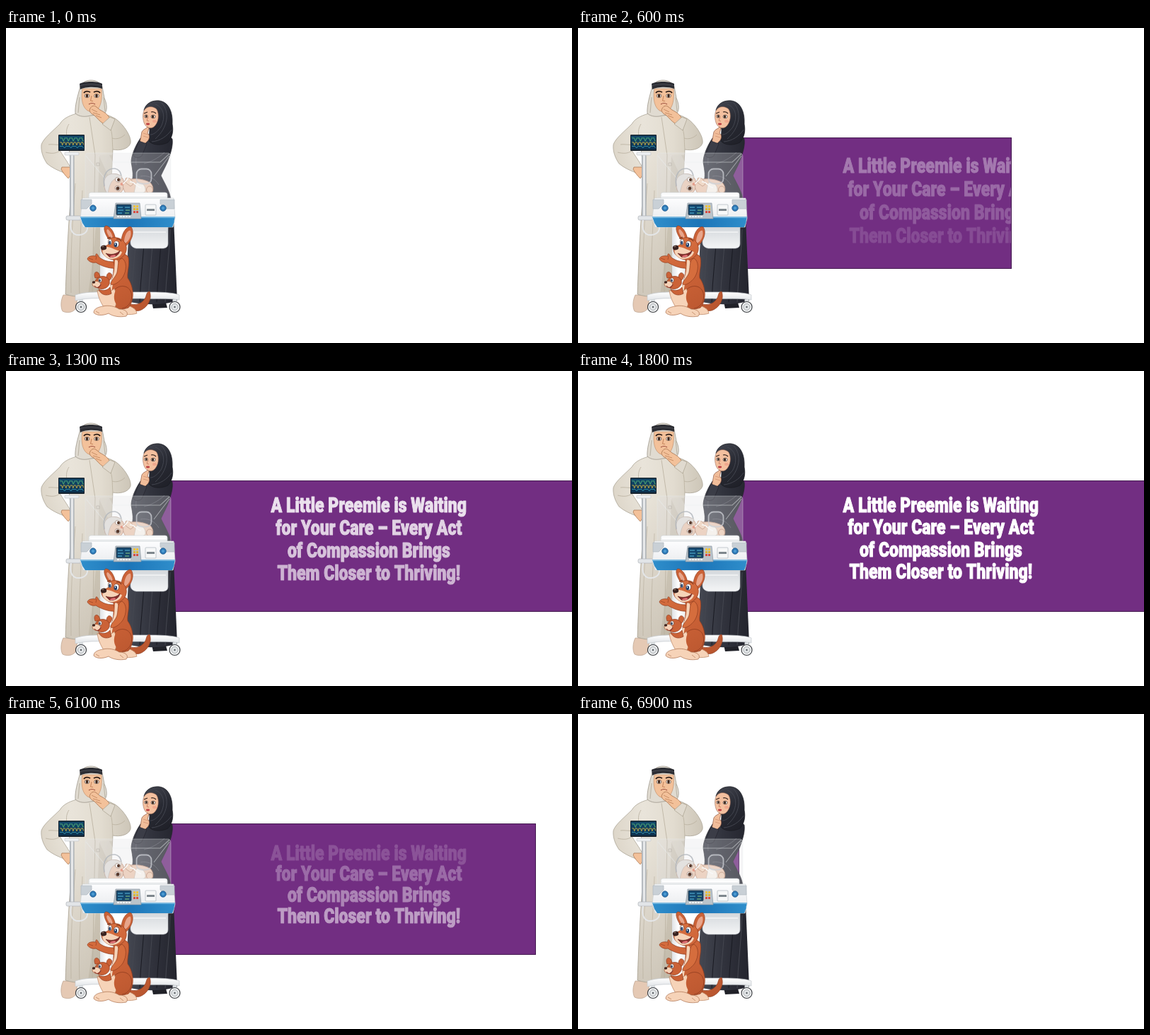
Write an HTML page with a canvas that moves like this. It is 800 by 446 pixels and loops after 7000 ms.

```html
<!DOCTYPE html>
<html lang="en">
<head>
<meta charset="utf-8">
<title>Preemie care banner</title>
<style>
  html, body { margin: 0; width: 100%; height: 100%; overflow: hidden; background: #fff; }
  canvas { display: block; width: 800px; height: 446px; }
</style>
</head>
<body>
<canvas id="stage" width="800" height="446"></canvas>
<script>
const ctx = document.getElementById('stage').getContext('2d');
const LOOP = 7000, STEP = 100;
const PURPLE = '#722e82', SKIN = '#f3c19a', FUR = '#cb6237', FUR_DARK = '#8f3b1f', CREAM = '#f6d3b8';

// Drawing helpers
function fade(x0, y0, x1, y1, ...colors) {
  const g = ctx.createLinearGradient(x0, y0, x1, y1);
  colors.forEach((c, i) => g.addColorStop(i / (colors.length - 1), c));
  return g;
}
function shape(d, fill, stroke, width = 0.7) {
  const p = new Path2D(d);
  if (fill) { ctx.fillStyle = fill; ctx.fill(p); }
  if (stroke) { ctx.strokeStyle = stroke; ctx.lineWidth = width; ctx.stroke(p); }
}
const line = (d, color, width = 0.8) => shape(d, null, color, width);
function oval(x, y, rx, ry, fill, stroke, turn = 0, width = 0.7) {
  ctx.beginPath();
  ctx.ellipse(x, y, rx, ry, turn, 0, Math.PI * 2);
  if (fill) { ctx.fillStyle = fill; ctx.fill(); }
  if (stroke) { ctx.strokeStyle = stroke; ctx.lineWidth = width; ctx.stroke(); }
}
function box(x, y, w, h, fill, r = 0, stroke, width = 0.7) {
  ctx.beginPath();
  ctx.roundRect(x, y, w, h, r);
  ctx.fillStyle = fill;
  ctx.fill();
  if (stroke) { ctx.strokeStyle = stroke; ctx.lineWidth = width; ctx.stroke(); }
}

// Motion
const clamp = v => Math.min(1, Math.max(0, v));
const edgeKeys = [
  [0, 210], [100, 233], [400, 446], [800, 756], [900, 793], [1000, 806],
  [5900, 806], [6000, 790], [6100, 749], [6200, 689], [6800, 262], [6900, 228], [7000, 210]
];
function slope(i) {
  const a = edgeKeys[i - 1], b = edgeKeys[i], c = edgeKeys[i + 1];
  if (!a || !c) return 0;
  const l = (b[1] - a[1]) / (b[0] - a[0]), r = (c[1] - b[1]) / (c[0] - b[0]);
  return l * r <= 0 ? 0 : 2 * l * r / (l + r);
}
function edgeAt(t) {
  const i = edgeKeys.findIndex((k, n) => n && t <= k[0]) - 1;
  const [t0, v0] = edgeKeys[i], [t1, v1] = edgeKeys[i + 1];
  const d = t1 - t0, u = (t - t0) / d, w = 1 - u;
  return v0 * (1 + 2 * u) * w * w + v1 * u * u * (3 - 2 * u)
    + d * u * w * (slope(i) * w - slope(i + 1) * u);
}

const lines = [
  'A Little Preemie is Waiting',
  'for Your Care – Every Act',
  'of Compassion Brings',
  'Them Closer to Thriving!'
];
const CONDENSED = 0.8;

function drawBanner(t) {
  const edge = edgeAt(t);
  if (edge <= 212) return;
  ctx.save();
  ctx.beginPath();
  ctx.rect(0, 0, edge, 446);
  ctx.clip();
  box(212, 155, 594, 186, PURPLE);
  ctx.font = '900 28.8px Roboto, "Open Sans", sans-serif';
  ctx.textAlign = 'center';
  ctx.textBaseline = 'alphabetic';
  ctx.lineWidth = 1.1;
  ctx.lineJoin = 'round';
  lines.forEach((text, i) => {
    const into = clamp((t - 100 - 100 * i) / 1400);
    const out = clamp((t - 5400 - 100 * i) / 850);
    const drop = 13 * (1 - into) ** 2 + 10 * out ** 2;
    // Mixed solid colour, so that outline and fill do not add up
    const mix = (from) => Math.round(from + (255 - from) * into * (1 - out));
    ctx.fillStyle = ctx.strokeStyle = `rgb(${mix(114)}, ${mix(46)}, ${mix(130)})`;
    ctx.save();
    ctx.translate(512.8, 200 + 31.4 * i + drop);
    ctx.scale(CONDENSED, 1);
    ctx.fillText(text, 0, 0);
    ctx.strokeText(text, 0, 0);
    ctx.restore();
  });
  ctx.restore();
  ctx.strokeStyle = '#43194f';
  ctx.lineWidth = 1;
  ctx.strokeRect(212.5, 155.5, Math.round(edge) - 213, 185);
}

function drawMan() {
  const cloth = fade(50, 0, 176, 0, '#ddd6c9', '#e9e4da', '#e2dcd0', '#cdc6b8');
  const fold = '#b9b09f';
  shape('M81 378 C77 386 77 396 80 401 C86 404 94 403 98 398 L102 379 Z', '#e5c9b4', '#b99f8b');
  const robe = 'M104 120 C92 123 81 127 76 136 C66 146 53 156 50 165 C49 174 52 183 58 192 C65 198 74 202 82 205 L91 197 C86 188 80 180 76 173 L88 161 L94 214 C89 260 86 320 84 377 C98 382 118 381 131 376 L136 300 L148 235 L151 172 C160 174 173 172 176 163 C178 153 164 134 154 128 C145 123 135 121 128 118 Z';
  shape(robe, cloth, '#a39b8c');
  shape(robe, fade(0, 180, 0, 380, 'rgba(150,138,118,0)', 'rgba(150,138,118,.3)'));
  shape('M132 180 L150 180 L147 235 L135 300 L131 376 L116 378 C126 310 130 250 132 180 Z', 'rgba(150,138,118,.2)');
  shape('M79 197 L91 197 C93 203 91 210 88 213 C83 208 80 204 78 200 Z', SKIN, '#a5714d');
  line('M118 126 L126 180 L122 376', fold);
  line('M88 161 C84 150 85 142 89 136 M60 165 C68 164 76 167 84 164 M56 176 C64 178 70 178 76 174', fold);
  line('M98 220 C94 270 91 320 92 375 M108 230 C106 290 102 330 104 378', 'rgba(170,160,142,.6)');
  line('M148 143 C151 152 150 163 151 172 M168 151 C163 156 156 158 150 156', fold);
  shape('M128 191 h4 v4 h-4 z', null, '#aaa294', 0.6);
  // Head
  shape('M105 83 C101 97 97 111 98 121 C104 126 112 126 120 124 L138 122 C144 118 143 108 139 99 L136 83 C131 71 109 71 105 83 Z', '#e0dbd1', '#928c80');
  line('M104 98 L102 120 M138 98 L140 118', '#bdb6a8', 1.2);
  shape('M108 86 C106 98 107 110 114 116 C119 120 126 119 130 115 C135 108 136 98 135 86 Z', SKIN, '#b77d55', 0.5);
  shape('M104 79 C110 75 130 75 136 79 L136 86 C128 83 112 83 105 87 Z', '#2c2d33');
  line('M104 82 C112 79 128 79 136 82', '#565861', 0.7);
  line('M110 92 C112 89 116 89 119 91 M124 91 C127 89 131 89 133 92', '#2c1d17', 1.9);
  for (const x of [114.5, 128]) {
    oval(x, 96, 3.4, 2.6, '#fff', '#51382b');
    oval(x, 96, 1.8, 2.2, '#3d2418');
  }
  line('M121 96 L119.5 103 L123 103.5', '#b77047');
  line('M117 108 C120 106 123 106 126 108', '#9b4d3c', 1.1);
  // Hand on chin
  shape('M119 114 C121 110 125 109 128 112 L133 116 C139 119 145 123 147 129 C146 134 142 137 137 135 C132 132 128 126 124 123 C119 121 117 117 119 114 Z', SKIN, '#9e6743');
  line('M121 115 L129 119 M123 120 L133 123 M127 124 L135 127', '#b77950', 0.7);
  shape('M147 126 L154 129 L148 145 L136 136 Z', '#e0dacf', '#aaa18f');
}

function drawWoman() {
  const dark = fade(170, 0, 240, 0, '#454852', '#31333d', '#24252e');
  shape('M206 388 L226 389 L228 396 L208 397 Z', '#202128');
  shape('M174 282 L168 385 C182 392 220 394 242 386 L237 270 H176 Z', dark);
  for (let i = 0; i < 5; i++) {
    const x = 181 + i * 12;
    line(`M${x + 3} 285 C${x + 2} 320 ${x - 3} 355 ${x - 4} 388`, i % 2 ? '#191a22' : '#454750', 1);
  }
  // Torso narrows to the waist
  shape('M190 156 C182 168 177 181 177 190 C179 202 181 210 177 220 L176 242 H233 C231 230 224 220 219 209 C223 200 228 192 231 182 C234 173 236 165 235 157 C228 150 200 148 190 156 Z', dark, '#24252c');
  line('M189 163 C185 174 183 184 184 194 M195 192 C204 190 216 184 224 176 M190 210 C200 208 210 212 216 222', '#5c5e68');
  // Scarf and face
  shape('M195 116 C198 106 207 102 217 103 C230 105 236 119 235 136 C237 146 235 155 229 162 C219 167 207 166 202 160 L203 144 Z', fade(195, 105, 236, 160, '#444650', '#282a33', '#1f2028'), '#191a20');
  shape('M195 117 C199 110 208 110 213 115 C217 122 216 134 209 140 C203 144 197 140 195 134 C193 128 193 122 195 117 Z', '#f4c09f', '#8b5d4a', 0.5);
  line('M211 108 C223 112 226 126 219 140 C213 148 208 151 204 151 M220 106 C232 119 229 141 211 157 M206 161 C218 160 228 153 234 144', '#4b4d57');
  line('M195 121 L200 119 M205 119 C208 118 210 119 212 121', '#38261f', 1.3);
  oval(198, 125, 2.3, 2, '#fff', '#392821');
  oval(208, 125.5, 3, 2.3, '#fff', '#392821');
  oval(198.3, 125, 1.3, 1.7, '#3b2417');
  oval(207.6, 125.5, 1.6, 1.9, '#3b2417');
  oval(210, 132, 3, 2, 'rgba(232,112,100,.3)');
  line('M201 126 L199 131 L202 132', '#be7659');
  oval(200.5, 136, 2.7, 1.4, '#bc3e42');
  shape('M192 147 C194 143 198 143 200 140 L202 142 L200 149 C204 151 203 158 199 161 L193 167 L189 163 Z', '#f1bd9a', '#8f5a45');
  line('M194 149 L201 151 M194 153 L201 155', '#c58463', 0.6);
  shape('M188 160 L199 164 L192 181 C187 185 181 184 180 180 Z', '#3b3d47', '#24252e');
}

function drawMonitor() {
  box(90, 180, 6.5, 88, fade(90, 0, 97, 0, '#9da3a9', '#f4f5f6', '#8e959b'), 1);
  box(83, 176, 20, 4, '#eef0f2', 1, '#c4c8cc');
  box(85, 266, 21, 6, '#e2e5e8', 2, '#afb4b9');
  box(74, 151, 37, 23, '#18242f', 1);
  box(75, 152.5, 35, 19.5, fade(0, 153, 0, 172, '#11486b', '#0b304e'));
  const wave = (y, size, rate, color) => {
    ctx.beginPath();
    for (let x = 76; x < 110; x += 0.6) {
      ctx.lineTo(x, y - size * Math.sin((x - 76) * rate) - size * 0.6 * Math.cos((x - 76) * rate * 2));
    }
    ctx.strokeStyle = color;
    ctx.lineWidth = 0.9;
    ctx.stroke();
  };
  wave(157, 2, 0.9, '#5dbd77');
  wave(163, 1.8, 1.25, '#d6b846');
  wave(168, 0.9, 0.7, '#41afc8');
  line('M92 272 C89 287 95 294 104 293 C112 292 116 287 115 281', '#e4e6e8', 2);
}

function drawBaby() {
  oval(153, 222, 14, 15.5, '#ead2c3', '#bd9987', 0.3);
  shape('M139 222 C137 208 150 202 164 210 L162 215 C154 211 147 214 144 235 C141 232 139 227 139 222 Z', '#e3e1df', '#c7bfba');
  oval(158, 215, 3.8, 3, '#fff', '#8e7568', 0.4);
  oval(158, 227, 4, 3.3, '#fff', '#8e7568', 0.4);
  oval(159, 215, 2, 2.2, '#57382b');
  oval(158, 227, 2.5, 2.6, '#57382b');
  oval(164, 221, 2.5, 2, '#e59d8a');
  shape('M168 216 C178 212 194 213 204 219 C209 224 209 231 205 235 L170 235 C165 229 164 222 168 216 Z', '#ecd3c3', '#bd9987');
  shape('M184 219 C192 217 198 223 197 231 C194 235 187 235 181 233 Z', '#f5f1ed', '#cfc4bc');
  shape('M169 213 C174 210 179 216 180 221 L176 224 L169 219 Z', '#f0dac9', '#bd9987');
  oval(203, 229, 4.5, 5, '#eed5c4', '#bd9987');
  line('M166 207 C171 206 175 210 171 215 L165 221 M175 218 C181 216 185 226 191 226', '#f8f8f8', 1.5);
}

function drawIncubator() {
  // Hood
  shape('M116 177 H229 C232 177 233 180 233 183 V241 H112 V182 C112 179 113 177 116 177 Z', 'rgba(220,222,225,.27)', 'rgba(232,234,237,.5)');
  shape('M131 180 L146 180 L177 236 L157 236 Z', 'rgba(255,255,255,.18)');
  line('M113 181 L149 224 M231 181 L209 210 M150 190 H218 L231 178', 'rgba(235,238,241,.48)', 1.1);
  drawBaby();
  box(184.5, 199.5, 21, 21, 'rgba(235,238,242,.1)', 7, 'rgba(205,208,213,.75)', 1.8);
  line('M139 224 C136 208 143 198 154 199 C160 200 162 204 163 209', 'rgba(175,180,186,.8)', 1.5);
  // Underside
  box(133, 281, 18, 96, fade(133, 0, 151, 0, '#dfe2e5', '#fff', '#eef0f1'));
  shape('M176 282 H229 V305 C229 310 226 312 221 312 H184 C179 311 176 308 176 304 Z', fade(0, 282, 0, 312, '#d4d8dc', '#f4f5f6'), '#b9bec3');
  line('M179 289 H226', '#fff', 1);
  // Bed and cabinet
  box(117, 233, 111, 10, fade(0, 233, 0, 243, '#fff', '#e4e7e9'), 3, '#d3d7da');
  line('M119 237 H226', '#fff', 2);
  shape('M108 241 H237 L239 269 L236 282 H109 L105 270 Z', fade(0, 241, 0, 269, '#fdfdfe', '#eceef0'), '#ccd1d5');
  shape('M105 267 H239 L237 276 H189 L186 282 H112 L108 276 Z M189 274 H238 L235 282 H184 Z', fade(105, 0, 239, 0, '#2f8ecb', '#1c75b8', '#2f8ecb'));
  line('M105 268 H239', '#8cc4e6', 1.4);
  shape('M106 243 H121 V249 L114 256 H106 Z M238 243 H218 V249 L225 256 H238 Z', '#c9d0d6', '#b0b8bf');
  for (const x of [123, 222]) {
    oval(x, 255, 4.3, 4.3, '#2d78b6', '#1d5686');
    oval(x, 255, 2, 2, '#4d9dd2');
  }
  // Controls
  shape('M155 248 H189 L191 270 H152 Z', '#bac3ca', '#8a97a1');
  box(156, 250, 21, 14.5, '#14466d', 1, '#26333d');
  line('M158 254 H165 M168 254 H175 M158 258 H166 M158 262 H164', '#59b9dd', 1.1);
  line('M169 258 H175 M168 262 H174', '#8dcc82', 1.1);
  for (let i = 0; i < 6; i++) {
    box(180 + i % 2 * 4, 251 + (i >> 1) * 4, 3, 3, ['#f1c43c', '#e0b62f', '#d94a3f'][i >> 1], 0.5);
  }
  for (let i = 0; i < 5; i++) box(157 + i * 4, 266, 3, 2, '#edf0f2');
  box(197, 250, 15, 15, '#f7f8f8', 1, '#aeb6bc');
  box(199, 256, 11, 3, '#7e878d', 0.5);
  // Base and wheels
  shape('M98 378 C112 373 130 374 145 374 H205 C224 374 237 375 245 378 L245 385 C228 382 210 384 190 383 H142 C125 382 110 383 98 386 Z', fade(0, 374, 0, 385, '#fff', '#e2e5e8'), '#c6cbcf');
  for (const x of [106, 238.5]) {
    box(x - 3, 384, 6, 8, '#d7dbde', 1);
    oval(x, 395, 7.5, 7.5, '#f4f5f6', '#3c3f43', 0, 1.2);
    oval(x, 395, 4.6, 4.6, '#e2e5e7', '#8b9196');
    oval(x, 395, 1.2, 1.2, '#555b60');
  }
}

function drawKangaroo() {
  const fur = fade(130, 285, 195, 400, '#dc7443', FUR, '#b9562f');
  // Tail and far foot
  shape('M172 390 C184 394 193 390 197 382 C199 378 198 374 203 373 C207 384 200 396 189 400 C180 402 170 398 166 394 Z', fur, FUR_DARK);
  shape('M164 391 C176 393 184 397 185 404 C176 407 161 406 155 401 Z', CREAM, '#b9825f');
  // Body and arm
  shape('M152 324 C158 318 170 318 173 325 C175 336 171 345 172 354 C181 366 182 386 173 396 C160 401 147 396 145 386 C144 372 152 354 152 343 Z', fur, FUR_DARK);
  shape('M152 331 C142 331 136 328 131 324 C129 318 126 319 127 323 C121 322 116 323 115 327 C117 331 122 333 127 332 C135 337 146 341 154 340 Z', fur, FUR_DARK);
  line('M117 326 L123 328 M128 323 L127 328', FUR_DARK, 0.6);
  shape('M154 328 C160 326 160 340 157 350 C152 359 149 366 150 377 L145 384 C144 371 151 355 153 344 Z', CREAM);
  // Pouch and joey
  shape('M129 371 C137 376 148 374 153 369 C158 378 158 394 150 401 L142 400 C135 392 130 381 129 371 Z', CREAM, '#b9825f');
  shape('M142 354 C142 345 148 345 150 350 C149 356 145 359 142 360 Z', FUR, FUR_DARK);
  shape('M126 354 C123 347 127 343 131 347 L134 354 Z', FUR, FUR_DARK);
  oval(136, 360.5, 10.5, 9, FUR, FUR_DARK, -0.2);
  oval(128, 363, 6, 4.5, CREAM, '#a65b36', 0.2);
  oval(124, 360, 2.2, 1.7, '#3f241e');
  oval(133, 357, 2.5, 3.2, '#fff', '#633622');
  oval(132.5, 357.5, 1.2, 2, '#263a58');
  line('M125 365 C128 369 132 368 134 363', '#8d3429', 1.2);
  shape('M131 370 C138 373 144 371 147 367 L149 376 C142 380 134 378 131 370 Z', FUR, FUR_DARK);
  // Near leg and feet
  oval(166, 379, 13, 17, fur, null, 0.2);
  line('M154 370 C161 363 174 364 177 375 C180 386 173 396 164 397', FUR_DARK);
  shape('M137 394 C145 392 154 394 160 398 C169 398 174 403 170 408 C160 410 150 408 145 404 C136 408 127 407 124 403 C124 397 131 395 137 394 Z', CREAM, '#a96e4b');
  line('M127 401 L132 404 M161 402 L166 406', '#bd8561');
  // Near arm
  shape('M164 326 C171 330 171 343 165 353 C160 360 152 365 148 363 C147 359 155 353 157 346 C159 337 157 328 164 326 Z', '#d56d3d', FUR_DARK);
  // Head
  shape('M145 299 C138 289 137 280 142 280 C149 282 154 291 155 301 Z', FUR, FUR_DARK);
  shape('M147 297 C142 290 141 285 144 285 C149 289 151 294 151 299 Z', '#e7a58b');
  shape('M163 303 C163 289 172 279 177 282 C182 289 178 302 168 310 Z', FUR, FUR_DARK);
  shape('M167 303 C167 292 173 285 176 287 C178 294 174 302 168 305 Z', '#e7a58b');
  shape('M147 298 C156 294 168 299 170 309 C172 318 165 327 156 328 C146 329 136 323 135 314 C136 309 142 309 145 306 Z', fur, FUR_DARK);
  shape('M138 310 C148 309 152 314 164 317 C162 325 152 329 144 326 C138 323 134 317 138 310 Z', CREAM);
  oval(138, 311, 4.2, 3.4, '#38221f', null, -0.2);
  oval(137, 309.5, 1.5, 0.8, '#91776e');
  shape('M141 319 C149 322 157 320 161 315 C160 322 152 326 146 324 Z', '#872e2d', '#5e211d');
  oval(151, 323, 4, 1.4, '#e6777b', null, -0.2);
  oval(147, 303, 2.5, 4, '#fff', '#5c3221', 0.1);
  oval(156, 306, 3.6, 4.4, '#fff', '#5c3221', 0.1);
  oval(146.7, 304, 1.5, 2.8, '#24426d');
  oval(155, 307, 2.2, 3.1, '#24426d');
  oval(154.5, 306, 0.7, 0.9, '#fff');
  line('M143 298 L148 296 M156 299 C159 298 162 300 163 302', '#6e321d', 1.1);
}

let shown = -1;
function render(now) {
  const t = Math.floor(now % LOOP / STEP) * STEP;
  if (t !== shown) {
    shown = t;
    ctx.fillStyle = '#fff';
    ctx.fillRect(0, 0, 800, 446);
    drawBanner(t);
    drawMan();
    drawWoman();
    drawMonitor();
    drawIncubator();
    drawKangaroo();
  }
  requestAnimationFrame(() => render(performance.now() - start));
}
const start = performance.now();
render(0);
</script>
</body>
</html>
```
